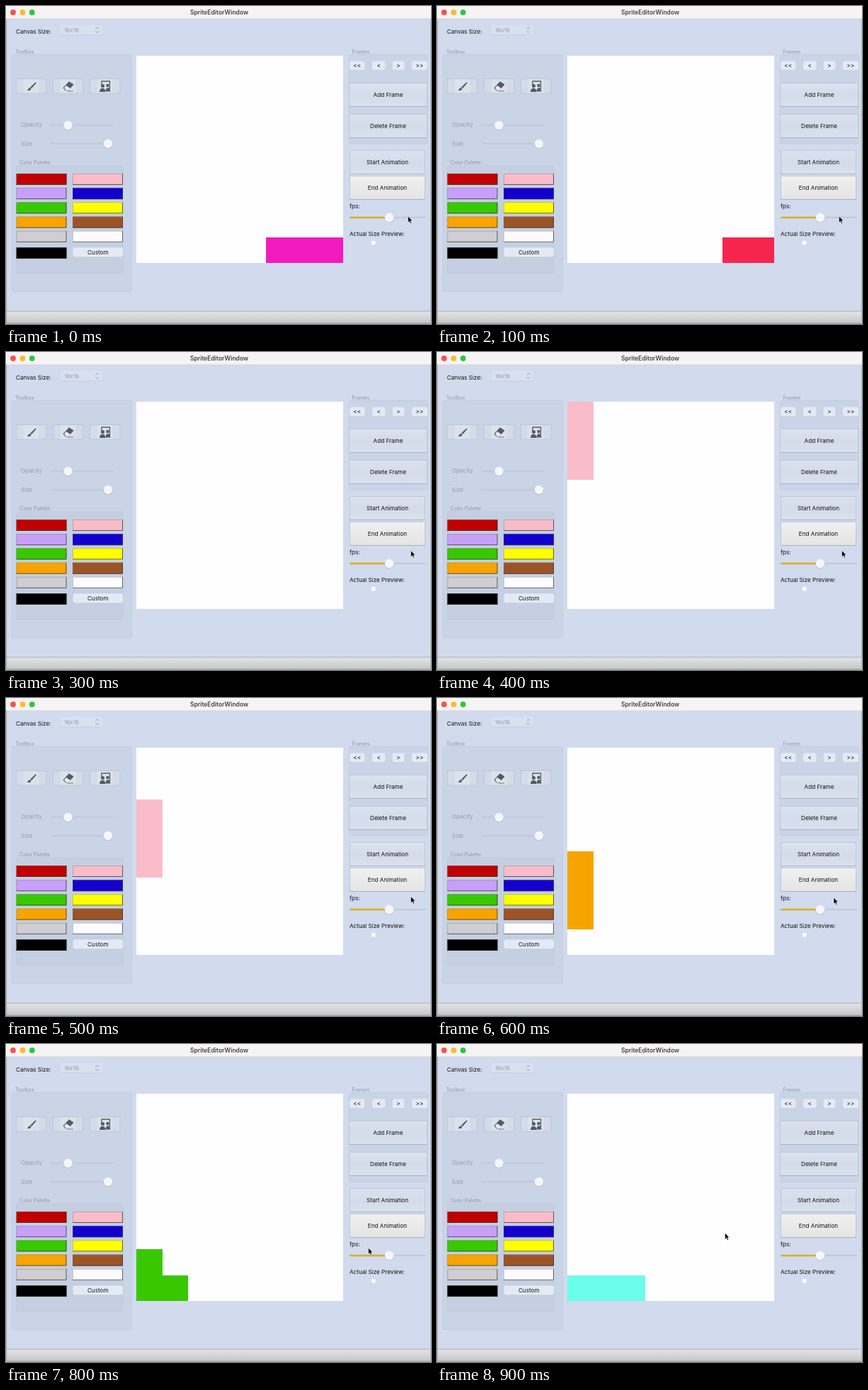
Recreate the animation shown at these times as an HTML page. Size 600 by 448 pixels, loop 1000 ms.

```html
<!DOCTYPE html>
<html lang="en">
<head>
<meta charset="utf-8">
<title>SpriteEditorWindow</title>
<style>
html, body { margin: 0; width: 100%; height: 100%; overflow: hidden; background: #d1dbed }
svg { display: block; width: 600px; height: 448px }
text { font: 8.15px Inter, "Open Sans", sans-serif; fill: #111 }
.mid { text-anchor: middle }
.title { font-size: 8.5px; font-weight: 600; fill: #454345 }
.group { font-size: 7.1px; fill: #8d96a7 }
.dim { fill: #959eae }
</style>
</head>
<body>
<svg id="stage" viewBox="0 0 600 448">
  <defs>
    <linearGradient id="bar" x2="0" y2="1"><stop stop-color="#e4e4e6"/><stop offset="1" stop-color="#c6c7ca"/></linearGradient>
    <linearGradient id="btn" x2="0" y2="1"><stop stop-color="#dbe3f0"/><stop offset=".5" stop-color="#d4dceb"/><stop offset="1" stop-color="#d9e1ee"/></linearGradient>
    <linearGradient id="lit" x2="0" y2="1"><stop stop-color="#f1f0f0"/><stop offset="1" stop-color="#e4e4e5"/></linearGradient>
  </defs>
  <g id="ui"></g>
  <g id="cells" shape-rendering="crispEdges"></g>
  <g id="mini"></g>
  <path id="cursor" d="M0 0V9.2L2.1 7.4 3.6 10.6 5.1 9.9 3.7 6.8H6.4Z" fill="#000" stroke="#fff" stroke-width=".6"/>
</svg>
<script>
const $ = id => document.getElementById(id);
const rect = (x, y, w, h, fill, more = '') =>
  `<rect x="${x}" y="${y}" width="${w}" height="${h}" fill="${fill}" ${more}/>`;
const text = (x, y, s, cls = '') => `<text x="${x}" y="${y}" class="${cls}">${s}</text>`;
const dot = (x, y, r, fill, more = '') => `<circle cx="${x}" cy="${y}" r="${r}" fill="${fill}" ${more}/>`;
const path = (d, more) => `<path d="${d}" ${more}/>`;
const panel = (x, y, w, h, fill) => rect(x, y, w, h, fill, 'rx="2" stroke="#bfcadc" stroke-width=".8"');

function button(x, y, w, h, label, fill = 'url(#btn)') {
  return rect(x + .5, y + .5, w - 1, h - 1, fill, 'stroke="#bcc4d0" stroke-width=".9"') +
    path(`M${x} ${y + h - .5}h${w}`, 'stroke="#a9b0bc" stroke-width=".8"') +
    text(x + w / 2, y + h / 2 + 3, label, 'mid');
}
function pill(x, y, w, h, label) {
  return rect(x, y + .6, w, h, '#b9c3d4', 'rx="3"') + rect(x, y, w, h, '#e4eaf5', 'rx="3"') +
    text(x + w / 2, y + h / 2 + 2.9, label, 'mid');
}
function swatch(x, y, fill) {
  return rect(x, y, 71, 16, fill) +
    path(`M${x} ${y + 15.5}h70.5V${y}`, 'fill="none" stroke="#333" stroke-opacity=".75"') +
    path(`M${x + .5} ${y + 15}V${y + .5}h70`, 'fill="none" stroke="#777" stroke-opacity=".5" stroke-width=".8"');
}
function slider(x, y, w, knob, r, track) {
  return rect(x, y - 1.2, w, 2.4, track, 'rx="1.2"') +
    dot(knob, y + .5, r + .4, '#b4bdcc') + dot(knob, y, r, '#f5f6f8');
}

const left = ['#c00000', '#c8a0fa', '#38c800', '#f8a400', '#d0ced3', '#000'];
const right = ['#f9bcc8', '#1400cd', '#ffff00', '#9c5426', '#fdfbff'];
const rowY = i => 236 + i * 20.2 + (i == 5 ? 3 : 0);

$('ui').innerHTML = [
  rect(0, 0, 600, 448, '#d1dbed'),
  rect(0, 0, 600, 18, '#f6f3f4'),
  rect(0, 17.5, 600, .8, '#d5d5da'),
  dot(10, 9, 3.9, '#fb5149'), dot(23.5, 9, 3.9, '#fdbb2d'), dot(36.8, 9, 3.9, '#2ac840'),
  text(301, 11.6, 'SpriteEditorWindow', 'mid title'),
  rect(0, 430, 600, 16.5, 'url(#bar)'),
  rect(0, 429.5, 600, 1, '#a9adb5'),
  rect(0, 446.3, 600, 1.7, '#a3a5a8'),
  rect(0, 18, 1.2, 430, '#a9adb4'), rect(599, 18, 1, 430, '#b4b9c3'),

  text(14, 39.3, 'Canvas Size:'),
  rect(76.5, 27.6, 59.5, 13.6, '#bdc8da', 'rx="3"'),
  rect(76.5, 27, 59.5, 13.5, '#d9e1ef', 'rx="3"'),
  text(82, 36.8, '16x16', 'dim'),
  path('M126.5 32.2l2.3-2.4 2.3 2.4M126.5 35.3l2.3 2.4 2.3-2.4', 'fill="none" stroke="#959eae"'),

  text(13, 67, 'Toolbox', 'group'),
  panel(8.5, 68.5, 169, 334, '#c9d4e6'),
  ...[14.5, 66.5, 118.5].map(x => rect(x, 102.5, 42.5, 20.5, '#d3dbe8', 'stroke="#b9c3d2" stroke-width=".8"') +
    rect(x + 10, 103, 22, 19.5, '#dce2eb')),
  // brush
  path('M41.8 107.2L34.2 114.6l1.8 1.6 6.8-7.8zM33.6 115.1c-2 .3-1.6 2.5-4 3.6 2.8 1 6 .1 5.8-2z', 'fill="#555b64"'),
  // eraser
  path('M80.5 115.2L89 106.2l6.6 4.4-7.8 9h-3.6z', 'fill="#555b64"'),
  path('M82 115.2l3-3.2 6.2 4.2-3.6 3h-2.5z', 'fill="#e5e8ec"'),
  path('M87 120h8', 'stroke="#555b64" stroke-width=".8"'),
  // two figures
  path('M135 113V106h11.5v11', 'fill="none" stroke="#555b64" stroke-width="1.3"'),
  dot(136.5, 112.6, 2.5, '#555b64'), dot(143.5, 112, 2.2, '#555b64'),
  path('M132 121c0-7 8.5-7 8.5 0zM140.5 120.5c0-7 7-7 7 0z', 'fill="#555b64"'),

  text(21, 170, 'Opacity', 'dim'),
  slider(63, 168, 89, 87.5, 6.2, '#bfcadb'),
  text(21, 197, 'Size', 'dim'),
  slider(63, 194, 88, 144, 6.2, '#bfcadb'),
  text(19, 223, 'Color Palette', 'group'),
  panel(14.5, 225, 150.5, 151.5, '#c4cfe1'),
  ...left.map((c, i) => swatch(14.5, rowY(i), c)),
  ...right.map((c, i) => swatch(94, rowY(i), c)),
  pill(94.5, 340.3, 70.5, 13.2, 'Custom'),

  text(488.5, 67, 'Frames', 'group'),
  panel(484.5, 68.5, 110.5, 125.5, '#c9d4e6'),
  pill(485, 77.5, 21.5, 13, '&lt;&lt;'), pill(517, 77.5, 18.5, 13, '&lt;'),
  pill(545.5, 77.5, 17, 13, '&gt;'), pill(573, 77.5, 22, 13, '&gt;&gt;'),
  button(484, 108, 111, 34, 'Add Frame'),
  button(484, 152, 111, 34, 'Delete Frame'),
  button(485, 203, 107, 34, 'Start Animation'),
  button(485, 239, 107, 34, 'End Animation', 'url(#lit)'),
  text(485, 284.5, 'fps:'),
  slider(485, 298, 108, 541, 6.4, '#c1cbdb'),
  rect(485, 296.7, 50, 2.6, '#dfae23', 'rx="1.2"'),
  text(485, 324, 'Actual Size Preview:'),
  rect(184, 70, 292, 292, '#fefdff')
].join('');

// Each pose: colour, cursor x, cursor y, then blocks [column, row, width, height] on an 8 x 8 grid
const poses = [
  ['#f31bbd', 567.5, 296, [5, 7, 3, 1]],
  ['#f5264e', 567.5, 296, [6, 7, 2, 1]],
  ['#f5264e', 571, 281, [7, 7, 1, 1]],
  ['#fff', 571.5, 279.5],
  ['#f9bcc8', 571.5, 279.5, [0, 0, 1, 3]],
  ['#f9bcc8', 571.5, 279.5, [0, 2, 1, 3]],
  ['#f8a400', 560, 281, [0, 4, 1, 3]],
  ['#ffff00', 535, 285.5, [0, 5, 1, 3]],
  ['#38c800', 511.5, 287, [0, 6, 1, 2], [1, 7, 1, 1]],
  ['#6bfdec', 406.5, 266, [0, 7, 3, 1]]
];
const grid = (x, y, size, color, blocks) => blocks.map(([c, r, w, h]) =>
  rect(x + c * size, y + r * size, w * size, h * size, color)).join('');

let shown = -1;
function draw(now) {
  const i = Math.floor(now % 1000 / 100);
  if (i != shown) {
    shown = i;
    const [color, x, y, ...blocks] = poses[i];
    $('cells').innerHTML = grid(184, 70, 36.5, color, blocks);
    $('mini').innerHTML = rect(516, 331, 5.5, 5.5, '#fcfcff') +
      `<g opacity=".35">${grid(516, 331, .69, color, blocks)}</g>`;
    $('cursor').setAttribute('transform', `translate(${x} ${y})`);
  }
  requestAnimationFrame(draw);
}
draw(performance.now());
</script>
</body>
</html>
```
